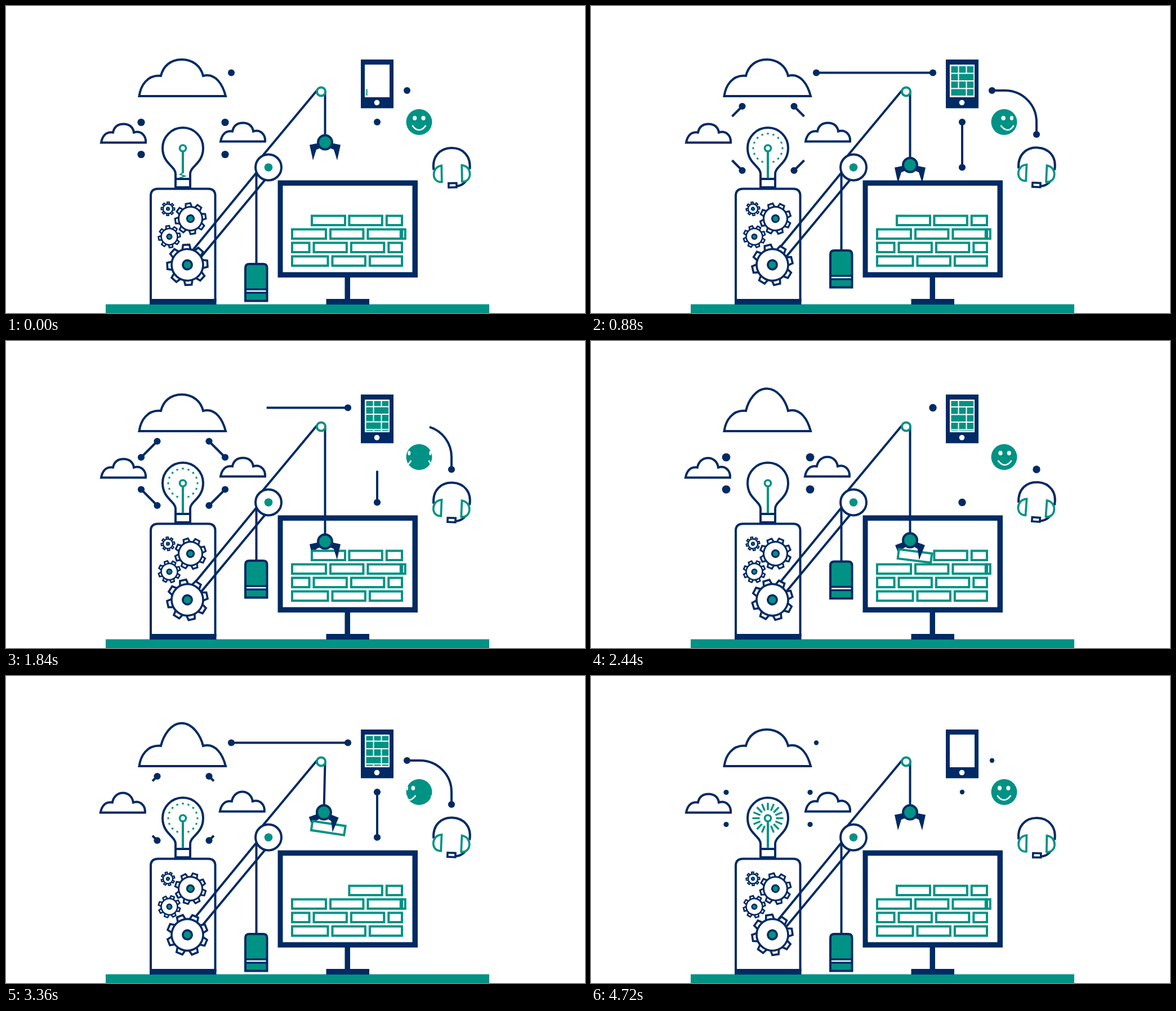
An HTML page with a canvas for the animation above (4760 ms loop, 1028 by 545 pixels).

```html
<!DOCTYPE html>
<html lang="en">
<head>
<meta charset="utf-8">
<title>Idea machine</title>
<style>
html, body { margin: 0; width: 100%; height: 100%; overflow: hidden; background: #fff; }
canvas { display: block; }
</style>
</head>
<body>
<canvas id="stage" width="1028" height="545"></canvas>
<script>
const c = document.getElementById('stage').getContext('2d');
const NAVY = '#002a64', TEAL = '#009284', WHITE = '#fff';
const LOOP = 4760, HALF = LOOP / 2, BEAT = LOOP / 5, TAU = Math.PI * 2;

const clamp = (u, lo = 0, hi = 1) => Math.min(hi, Math.max(lo, u));
const ramp = (t, a, b) => clamp((t - a) / (b - a));
const step = (t, a, b) => {
  const u = ramp(t, a, b);
  return u * u * (3 - 2 * u);
};
// dot radius: springs open at a, closes at b
function pop(p, a, b) {
  const v = ramp(p, a, a + 240) - 1;
  return 6.1 * (1 + 2.7 * v ** 3 + 1.7 * v * v) * (1 - step(p, b, b + 80));
}

function paint(path, stroke, fill, w = 4) {
  if (fill) { c.fillStyle = fill; c.fill(path); }
  if (stroke) { c.strokeStyle = stroke; c.lineWidth = w; c.stroke(path); }
}
const shape = (d, stroke, fill, w) => paint(new Path2D(d), stroke, fill, w);
const line = (x1, y1, x2, y2, col = NAVY, w = 4) => shape(`M${x1} ${y1}L${x2} ${y2}`, col, null, w);
const box = (x, y, x2, y2, col) => { c.fillStyle = col; c.fillRect(x, y, x2 - x, y2 - y); };
function disc(x, y, r, stroke, fill, w) {
  if (r <= 0) return;
  const p = new Path2D();
  p.arc(x, y, r, 0, TAU);
  paint(p, stroke, fill, w);
}
function at(x, y, angle, draw) {
  c.save();
  c.translate(x, y);
  c.rotate(angle);
  draw();
  c.restore();
}

function clouds(pulse) {
  const top = 95 - 11.5 * pulse;
  shape(`M236.5 160C239 142 250 122 275 124C279 107 292 ${top} 312 ${top}` +
    `C332 ${top} 346 107 350 124C372 118 385 140 390 160Z`, NAVY, WHITE);
  for (const [x, y] of [[169, 242.5], [381, 240.5]])
    at(x - 1.2 * pulse, y, 0, () => {
      const peak = -33 - 2 * pulse;
      shape(`M0 0C2-11 8-20 21-18C23-28 30 ${peak} 40 ${peak}C50 ${peak} 57-27 58-18C71-22 80-12 79 0Z`, NAVY, WHITE);
    });
}

function bulb(p) {
  shape('M301 307V298C301 284 278 280 278 252A36 36 0 0 1 350 252C350 280 327 284 327 298V307', NAVY, WHITE);
  shape('M301 307H327V322H301Z', NAVY, WHITE);
  const q = (p + HALF) % HALF;
  const lit = q > 200 && q < HALF - 20;
  const spark = Math.abs(p - 10) < 30;
  line(314, 258, 314, spark ? 297 : 305.5, TEAL);
  if (spark) shape('M314 296L309 299L318 302L308 305', TEAL, null, 2);
  disc(314, 252.5, 5.5, TEAL, WHITE, 3.6);
  if (!lit) return;
  const inner = 12 + 12.5 * step(q, 200, 450) - 10 * step(q, 2100, 2260);
  const outer = 12 + 15.5 * step(q, 200, 380);
  for (let i = 1; i < 16; i++)
    at(314, 252.5, i * TAU / 16, () => line(0, inner, 0, outer, TEAL, 3.4));
}

function gear(x, y, r, angle) {
  const w = 1.7 + r * .068, top = r * 1.22 + 1.5;
  at(x, y, angle, () => {
    for (let i = 0; i < 8; i++) {
      c.rotate(TAU / 8);
      shape(`M${-r * .27} ${2 - r}L${-r * .2} ${-top}H${r * .2}L${r * .27} ${2 - r}Z`, NAVY, WHITE, w);
    }
    disc(0, 0, r, NAVY, WHITE, w);
    disc(0, 0, r * .29, NAVY, TEAL, w);
  });
}

function machine(t) {
  shape('M257 525V337Q257 324.500 270 324.500H359Q371.500 324.500 371.500 337V525', NAVY, WHITE);
  box(255, 520, 373.5, 530, NAVY);
  const turn = t / BEAT * 3 * TAU / 8 - .06;
  gear(287.5, 360, 8.5, turn + .1);
  gear(327.5, 377.5, 21, turn - .1);
  gear(290, 409.5, 14.5, turn - .1);
  line(325, 441.5, 447, 293);
  line(340, 453, 463, 305);
  gear(322, 459.5, 28, turn);
}

// a link from (x1, y1) to (x2, y2), drawn between two fractions of its length
function link(x1, y1, x2, y2, from, to, bend = 0) {
  if (to - from < .002) return;
  const length = bend
    ? Math.abs(x2 - x1) + Math.abs(y2 - y1) - bend * (2 - Math.PI / 2)
    : Math.hypot(x2 - x1, y2 - y1);
  c.save();
  c.setLineDash([length * (to - from), 2000]);
  c.lineDashOffset = -length * from;
  c.beginPath();
  c.moveTo(x1, y1);
  if (bend) c.arcTo(x2, y1, x2, y2, bend);
  c.lineTo(x2, y2);
  c.strokeStyle = NAVY;
  c.lineWidth = 4;
  c.stroke();
  c.restore();
}

function links(p, back) {
  const first = pop(p, -85, 1600), last = pop(p, 600, 2200);
  const head = step(p, 80, 625), tail = step(p, 1700, 2086);
  const connect = (x1, y1, x2, y2, bend) => {
    link(x1, y1, x2, y2, back ? 1 - head : tail, back ? 1 - tail : head, bend);
    disc(x1, y1, back ? last : first, null, NAVY);
    disc(x2, y2, back ? first : last, null, NAVY);
  };
  connect(400, 118.5, 607, 118.5);
  connect(659, 206, 659, 286.5);
  connect(712, 150, 791, 228, 56);

  const outer = pop(p, -85, 560) * 1.1 + pop(p, 1460, 2200);
  const inner = pop(p, 330, 1900);
  const from = step(p, 700, 1140) - step(p, 1140, 1440);
  const to = step(p, 80, 350) - step(p, 1980, 2200);
  for (const sx of [-1, 1]) for (const sy of [-1, 1]) {
    const x1 = 314.5 + sx * 74.5, y1 = 235 + sy * 28.5;
    const x2 = 314.5 + sx * 46, y2 = 235 + sy * 57;
    link(x1, y1, x2, y2, from, to);
    disc(x1, y1, outer, null, NAVY);
    disc(x2, y2, inner, null, NAVY);
  }
}

function phone(t) {
  box(630, 95, 688, 181.5, NAVY);
  box(637, 104, 681, 162, WHITE);
  disc(658.5, 171.5, 4.8, null, WHITE);
  const scroll = 21.6 * (step(t, 1520, 2900) - step(t, 2900, 3530));
  const now = t > LOOP - 60 ? t - LOOP : t;
  const layouts = [[12, 12, 12], [12, 26], [12, 12, 12], [26, 12]];
  c.save();
  c.beginPath();
  c.rect(639, 106.5, 40.5, 53);
  c.clip();
  for (let r = 0; r < 6; r++) {
    const late = 100 * (3 - r);
    const grow = step(now, late - 55, late + 345) - step(now, late + 3530, late + 3930);
    const y = 107 + r * 13.5 - scroll;
    let x = 0;
    for (const w of layouts[r % 4]) {
      box(639.5 + x * grow, y, 639.5 + (x + w) * grow, y + 11.5, TEAL);
      x += w + 2;
    }
  }
  c.restore();
}

// the face wraps round a turning ball and repeats every TURN radians
function smiley(t) {
  const R = 23, TURN = 2.6;
  const spin = TURN * (1 + Math.tanh(4 * (t / LOOP - .508)) / Math.tanh(2));
  c.save();
  c.translate(733.5, 206);
  disc(0, 0, R, null, TEAL);
  c.beginPath();
  c.arc(0, 0, R, 0, TAU);
  c.clip();
  for (let mid = spin; mid > -2; mid -= TURN) {
    if (mid > 2) continue;
    const px = a => R * Math.sin(clamp(mid + a, -TAU / 4, TAU / 4));
    for (const eye of [-.34, .34]) {
      c.beginPath();
      c.ellipse(px(eye), -7, 3.8 * Math.max(0, Math.cos(mid + eye)), 4, 0, 0, TAU);
      c.fillStyle = WHITE;
      c.fill();
    }
    c.beginPath();
    for (let a = -.55; a < .56; a += .11) c.lineTo(px(a), 14 - 8 * (a / .55) ** 2);
    c.strokeStyle = WHITE;
    c.lineWidth = 2.6;
    c.stroke();
  }
  c.restore();
}

function headset(tilt) {
  at(791.3, 287 - 3.5 * Math.abs(tilt), tilt * .14, () => {
    shape('M-32 4C-35-20-20-34.500 0-34.500C20-34.500 35-20 32 4M30 16Q22 33 8 33.500', NAVY);
    for (const side of [-1, 1]) {
      c.save();
      c.scale(side, 1);
      shape('M18-3.500C28-2 32 5 32 12C32 20 27 26 18 25.500Z', TEAL, WHITE, 3.7);
      c.restore();
    }
    shape('M-6 28H8V35.500H-6Z', NAVY, WHITE, 3.6);
  });
}

const brick = (x, y, x2, y2) => shape(`M${x + 2} ${y + 2}H${x2 - 2}V${y2 - 2}H${x + 2}Z`, TEAL, WHITE);

function monitor() {
  box(482.5, 309.5, 731, 482, NAVY);
  box(491.5, 319, 721.5, 472.5, WHITE);
  box(601.5, 482, 611, 521, NAVY);
  box(568.5, 520, 645, 530, NAVY);
  const pitch = 66.4, left = 506, right = 705;
  for (let r = 0; r < 4; r++) {
    const y = 370.5 + r * 24;
    let joint = 539 + 33 * (r % 2) + 3.5 * (r >> 1);
    // the top row leaves room for the loose brick
    if (r === 0) joint += pitch;
    else brick(left, y, joint - 2, y + 20.5);
    for (; joint < right; joint += pitch)
      brick(joint + 2, y, Math.min(right, joint + pitch - 2), y + 20.5);
  }
}

function crane(t) {
  const drop = step(t, 400, 1600) - ramp(t, 2200, 3340) ** 2.5;
  const top = 458 - 68 * drop, rope = 87 + 114 * drop;
  const swing = -.052 * Math.sin(TAU * ramp(t, 3300, 4100));
  const x = 566.5 + rope * Math.sin(swing), y = 155 + rope * Math.cos(swing);

  line(444.5, 295, 444.5, top);
  at(425, top, 0, () => {
    shape('M0 65.500V7Q0 0 7 0H31.500Q38.500 0 38.500 7V65.500Z', NAVY, TEAL);
    box(0, 43.3, 38.5, 52.7, NAVY);
    box(2, 46.8, 36.5, 49.3, WHITE);
  });
  line(455, 266.5, 552, 150);
  disc(466, 286.5, 23, NAVY, WHITE);
  disc(466, 286.5, 7.3, null, TEAL);
  line(566.5, 154, x, y);
  disc(559.5, 152, 7.6, TEAL, WHITE);

  const grip = .16 * (step(t, 1800, 2150) - step(t, 4060, 4180));
  const claw = side => at(x, y, -swing, () => {
    c.scale(side, 1);
    c.rotate(grip);
    shape('M10 1L27.500 4.500L21.500 32L15.500 13L8 10Z', null, NAVY);
  });
  claw(-1);
  const held = step(t, 2200, 2440) - ramp(t, 4140, 4360) ** 2;
  const mix = (a, b) => a + (b - a) * held;
  at(mix(572.5, x + 8.5 + 28 * swing), mix(380.7, y + 28), held * (.125 - swing),
    () => brick(-31.5, -10.2, 31.5, 10.2));
  claw(1);
  disc(x, y, 12.5, NAVY, TEAL);
}

function frame(ms) {
  const t = ms % LOOP;
  // the links start a little before each half loop and run back in the second
  const shifted = (t + 95) % LOOP;
  const p = shifted % HALF - 95, back = shifted >= HALF;

  box(0, 0, 1028, 545, WHITE);
  box(177, 529.5, 858, 545, TEAL);
  clouds(Math.sin(Math.PI * t / BEAT) ** 4);
  bulb(p);
  machine(t);
  monitor();
  phone(t);
  smiley(t);
  headset(-Math.sin(TAU * (t + 20) / BEAT));
  links(p, back);
  crane(t);
}

const start = performance.now();
(function tick() {
  frame(performance.now() - start);
  requestAnimationFrame(tick);
})();
</script>
</body>
</html>
```
